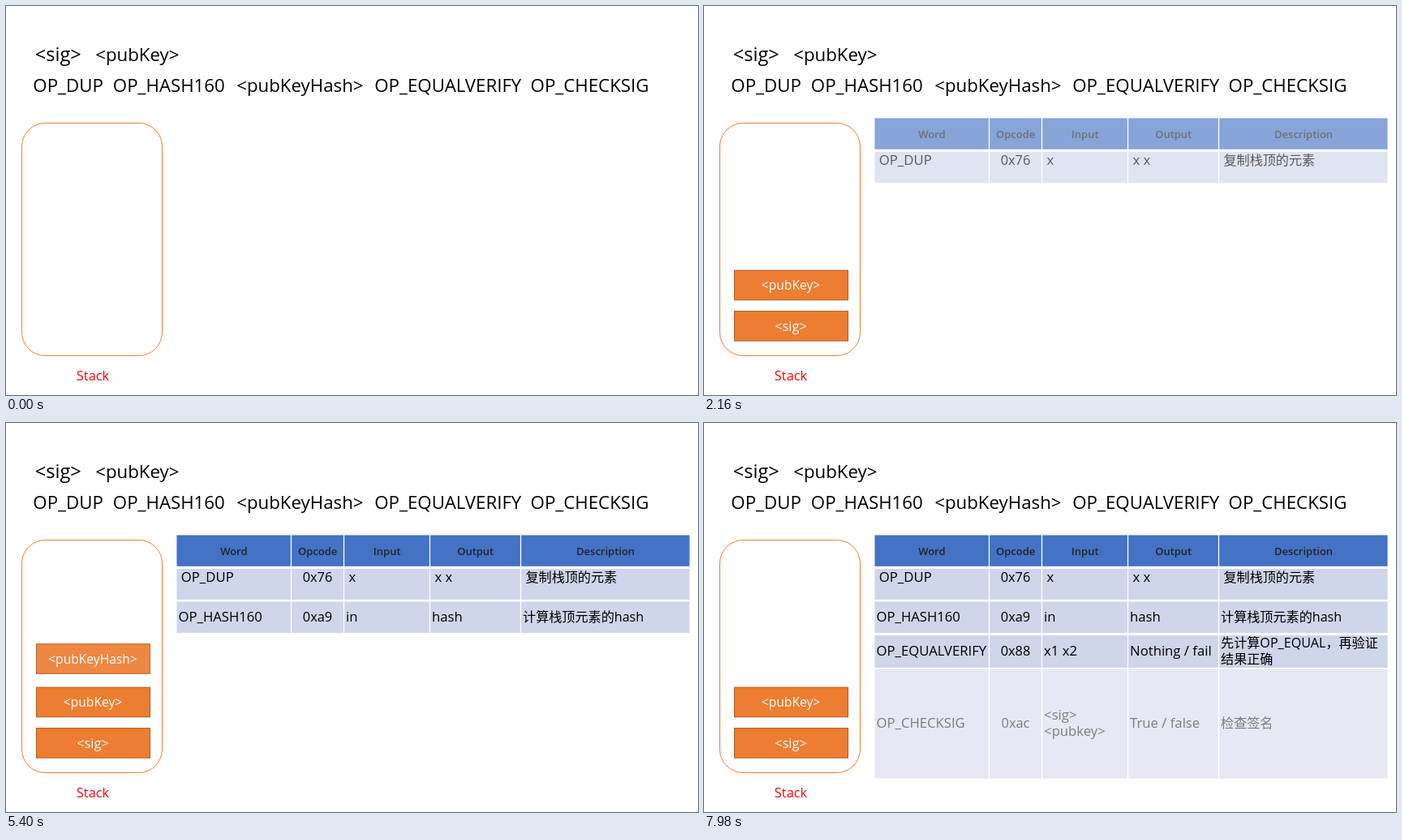
Write an HTML page that moves like this. It is 853x480 px and loops after 8000 ms.

```html
<!DOCTYPE html>
<html lang="zh-CN">
<head>
<meta charset="utf-8">
<title>Script stack</title>
<style>
  html, body { margin: 0; width: 100%; height: 100%; overflow: hidden; background: #fff; }
  svg { display: block; width: 853px; height: 480px; }
  text { font-family: "Open Sans", "Noto Sans CJK SC", "Noto Sans", sans-serif; white-space: pre; }
</style>
</head>
<body>
<svg id="stage" viewBox="0 0 853 480"></svg>
<script>
const LOOP = 8000, STEP = 60;
const FLOAT = 900, FADE = 450, RISE = 48;
const ORANGE = '#ed7d31';
const stage = document.getElementById('stage');

function add(parent, tag, attrs, content) {
  const el = document.createElementNS('http://www.w3.org/2000/svg', tag);
  for (const key in attrs) el.setAttribute(key, attrs[key]);
  if (content) el.textContent = content;
  parent.appendChild(el);
  return el;
}

function label(parent, x, y, size, content, attrs) {
  return add(parent, 'text', { x, y, 'font-size': size, ...attrs }, content);
}

const middle = { 'text-anchor': 'middle' };

// Script line
const script = [
  [64.3, 68, '<sig>', 23.6], [161.8, 68, '<pubKey>'],
  [76.6, 106, 'OP_DUP'], [200.8, 106, 'OP_HASH160'], [362.4, 106, '<pubKeyHash>'],
  [544.8, 106, 'OP_EQUALVERIFY'], [719.5, 106, 'OP_CHECKSIG']
];
for (const [x, y, word, size = 22.25] of script) label(stage, x, y, size, word, middle);

// Stack outline
add(stage, 'rect', {
  x: 19.5, y: 144.5, width: 173, height: 287, rx: 28.8, fill: 'none', stroke: ORANGE
});
label(stage, 107, 462, 16.4, 'Stack', { ...middle, fill: '#f00' });

// Table: cells are separated by white gaps
const edges = [209.8, 351.5, 416.5, 522.5, 634.5, 843.2];
const GAP = 0.65;

function cells(parent, top, bottom, fill) {
  for (let i = 0; i < 5; i++) {
    const x = edges[i] + GAP;
    add(parent, 'rect', { x, y: top, width: edges[i + 1] - GAP - x, height: bottom - top, fill });
  }
}

function row(parent, top, bottom, base, inset, values) {
  cells(parent, top, bottom, '#cfd5ea');
  values.forEach((value, i) => {
    const lines = [].concat(value);
    lines.forEach((line, n) => {
      const y = base + (n - (lines.length - 1) / 2) * 20;
      if (i === 1) label(parent, 384, y, 16.4, line, middle);
      else label(parent, edges[i] + inset, y, i === 4 ? 16.1 : 16.7, line);
    });
  });
}

const rows = [0, 1, 2, 3].map(() => add(stage, 'g', {}));
cells(rows[0], 138.4, 176.8, '#4472c4');
['Word', 'Opcode', 'Input', 'Output', 'Description'].forEach((name, i) => {
  label(rows[0], (edges[i] + edges[i + 1]) / 2 + 0.2, 163, 13, name,
    { ...middle, 'font-weight': 600, fill: '#202429' });
});
row(rows[0], 180, 218, 196, 6, ['OP_DUP', '0x76', 'x', 'x x', '复制栈顶的元素']);
row(rows[1], 220.5, 259, 245, 2.6, ['OP_HASH160', '0xa9', 'in', 'hash', '计算栈顶元素的hash']);
row(rows[2], 262, 302, 287, 2.6,
  ['OP_EQUALVERIFY', '0x88', 'x1 x2', 'Nothing / fail', ['先计算OP_EQUAL，再验证', '结果正确']]);
row(rows[3], 303.5, 438.5, 376, 2.6,
  ['OP_CHECKSIG', '0xac', ['<sig>', '<pubkey>'], 'True / false', '检查签名']);

const fades = [1870, 3200, 6395, 7750].map((start, i) => ({ el: rows[i], start }));

// Stack items drop in from above and leave upwards
function item(name, y, enter, leave = Infinity) {
  const el = add(stage, 'g', {});
  add(el, 'rect', { x: 37.5, y, width: 140, height: 36.6, fill: ORANGE, stroke: '#ae5a21' });
  label(el, 107, y + 24, name === '<sig>' ? 16.4 : 15.6, name, { ...middle, fill: '#fff' });
  return { el, enter, leave };
}

const items = [
  item('<sig>', 376.6, 20),
  item('<pubKey>', 326.2, 965),
  item('<pubKey>', 276.4, 2285, 3655),
  item('<pubKeyHash>', 276.4, 4570, 6840),
  item('<pubKeyHash>', 229.4, 5490, 6840)
];

const progress = (t, start, length) => Math.min(1, Math.max(0, (t - start) / length));

function draw(t) {
  for (const { el, start } of fades) el.setAttribute('opacity', progress(t, start, FADE));
  for (const { el, enter, leave } of items) {
    const shown = progress(t, enter, FLOAT) - progress(t, leave, FLOAT);
    el.setAttribute('opacity', shown);
    el.setAttribute('transform', `translate(0 ${(shown - 1) * RISE})`);
  }
}

const begin = performance.now();
function tick() {
  const t = (performance.now() - begin) % LOOP;
  draw(Math.floor(t / STEP) * STEP);
  requestAnimationFrame(tick);
}
tick();
</script>
</body>
</html>
```
